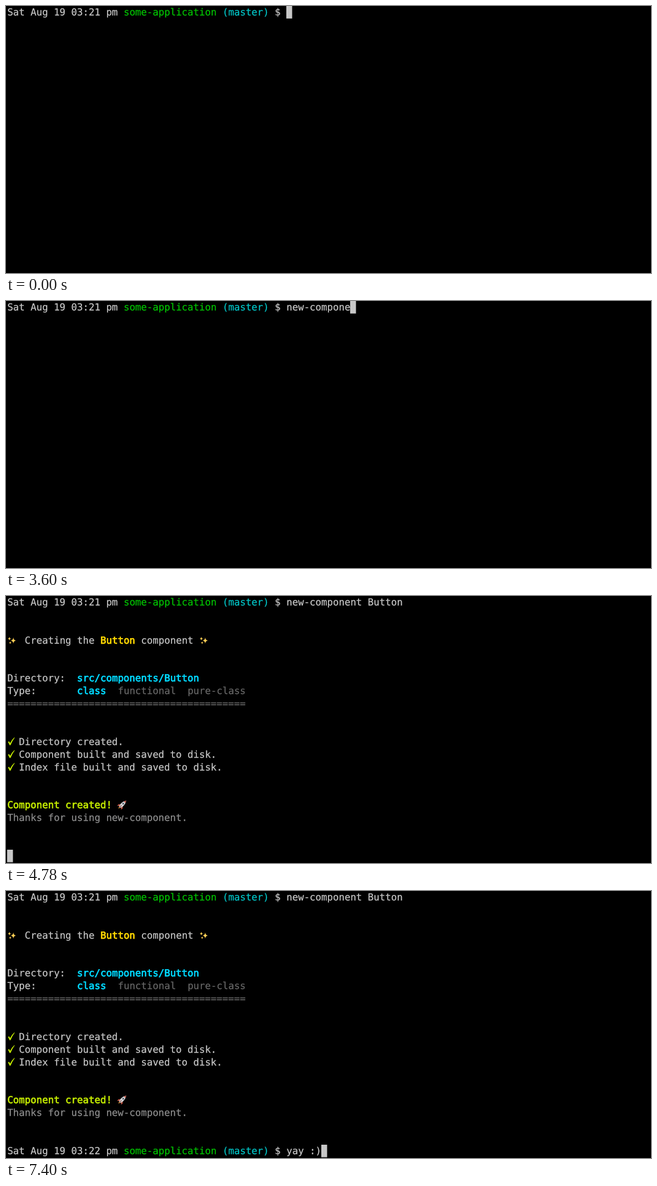
These frames come from a looping animation (1162 px wide and 482 px high, 8960 ms). An HTML page:

```html
<!DOCTYPE html>
<html lang="en">
<head>
<meta charset="utf-8">
<title>Terminal</title>
<style>
  html, body { margin: 0; width: 100%; height: 100%; overflow: hidden; background: #000; }
  svg { display: block; width: 100%; height: 100%; }
  text {
    font: 17.4px "DejaVu Sans Mono", monospace;
    white-space: pre;
    text-rendering: geometricPrecision;
    fill: currentColor;
    stroke: currentColor;
    stroke-width: .25px;
  }
  .bold { stroke-width: .8px; }
</style>
</head>
<body>
<svg viewBox="0 0 1162 482">
  <defs>
    <path id="check" d="M1.2 11.6 L3.2 10.2 L5 13.4 Q8.2 7.2 12.6 3.2 L13.3 3.8 Q9 9.6 5.8 17.2 L4.3 17.4 Z" fill="#c0e600"/>
    <path id="star" d="M0 -1 Q.1 -.1 1 0 Q.1 .1 0 1 Q-.1 .1 -1 0 Q-.1 -.1 0 -1 Z"/>
    <g id="sparkles" fill="#ffcf55">
      <use href="#star" transform="translate(10.8 11.4) scale(4.6 5.6)"/>
      <use href="#star" transform="translate(3.8 8) scale(2.8 3.2)"/>
      <use href="#star" transform="translate(5.2 15.4) scale(2 2.3)"/>
    </g>
    <g id="rocket">
      <g transform="translate(8 10.6) rotate(45)">
        <path d="M-2.6 1 L-5.4 4.4 L-5 8 L-2 5.4 Z M2.6 1 L5.4 4.4 L5 8 L2 5.4 Z" fill="#b9503f"/>
        <path d="M-1.5 6 L0 10 L1.5 6 Z" fill="#f0a63c"/>
        <path d="M0 -10 Q3.7 -5 3 2 L2.1 6.4 L-2.1 6.4 L-3 2 Q-3.7 -5 0 -10 Z" fill="#d3d5d8"/>
        <path d="M0 -10 Q1.5 -8 2.1 -6 L-2.1 -6 Q-1.5 -8 0 -10 Z" fill="#c25a4c"/>
        <circle cy="-2.4" r="1.6" fill="#4b5560"/>
        <path d="M0 2 V7" stroke="#8c4a42" stroke-width="1.2"/>
      </g>
    </g>
  </defs>
  <g id="screen"></g>
</svg>
<script>
const LOOP = 8960, LEFT = 2.4, COL = 10.476, ROW = 22.9, PROMPT = 48;
const GRAY = '#c7c7c7', GREEN = '#00c200', CYAN = '#00c5c7';
const BLUE = '#00d9ff', GOLD = '#ffd900', LIME = '#c0e600', DARK = '#666', MID = '#8e8e8e';
const ENTER = 4670, OUTPUT = 4780, DONE = 4900;

// [time, characters typed]
const COMMAND = { text: 'new-component Button', keys: [
  [2600, 1], [2840, 4], [2980, 6], [3250, 7], [3370, 9], [3480, 10], [3600, 11], [3720, 13],
  [3840, 14], [3960, 15], [4080, 16], [4190, 18], [4310, 19], [4430, 20]] };
const REPLY = { text: 'yay :)', keys: [[6870, 2], [6990, 3], [7140, 4], [7250, 5], [7400, 6]] };

// Columns are fractional, rows sit on whole pixels.
const colX = col => LEFT + col * COL;
const rowY = row => Math.round(row * ROW);
const put = (row, col, str, color = GRAY, cls = '') =>
  `<text x="${colX(col)}" y="${17 + rowY(row)}" color="${color}" class="${cls}">${str}</text>`;
const bold = (row, col, str, color) => put(row, col, str, color, 'bold');
const icon = (row, col, id) =>
  `<use href="#${id}" transform="translate(${colX(col)} ${rowY(row)})"/>`;
const cursor = (row, col) =>
  `<rect x="${Math.round(colX(col))}" y="${rowY(row)}" width="10.5" height="22.6" fill="${GRAY}"/>`;

const prompt = (row, clock) =>
  put(row, 0, `Sat Aug 19 ${clock} pm`) + put(row, 20, 'some-application', GREEN) +
  put(row, 37, '(master)', CYAN) + put(row, 46, '$');

const typed = ({ text, keys }, t) =>
  text.slice(0, keys.reduce((n, [at, count]) => t >= at ? count : n, 0));

const done = (row, str) => icon(row, 0, 'check') + put(row, 2, str);

const report = [
  icon(3, 0, 'sparkles'), put(3, 3, 'Creating the'), bold(3, 16, 'Button', GOLD),
  put(3, 23, 'component'), icon(3, 33, 'sparkles'),
  put(6, 0, 'Directory:'), bold(6, 12, 'src/components/Button', BLUE),
  put(7, 0, 'Type:'), bold(7, 12, 'class', BLUE),
  put(7, 19, 'functional', DARK), put(7, 31, 'pure-class', DARK),
  put(8, 0, '='.repeat(41), DARK),
  done(11, 'Directory created.'),
  done(12, 'Component built and saved to disk.'),
  done(13, 'Index file built and saved to disk.'),
  bold(16, 0, 'Component created!', LIME), icon(16, 19, 'rocket'),
  put(17, 0, 'Thanks for using new-component.', MID)
].join('');

function draw(t) {
  const command = typed(COMMAND, t);
  const first = prompt(0, '03:21') + put(0, PROMPT, command);
  if (t < ENTER) return first + cursor(0, PROMPT + command.length);
  if (t < OUTPUT) return first + cursor(1, 0);
  if (t < DONE) return first + report + cursor(20, 0);
  const reply = typed(REPLY, t);
  return first + report + prompt(20, '03:22') + put(20, PROMPT, reply) +
    cursor(20, PROMPT + reply.length);
}

const screen = document.getElementById('screen');
const start = performance.now();
let shown = '';
function tick() {
  const next = draw((performance.now() - start) % LOOP);
  if (next !== shown) screen.innerHTML = shown = next;
  requestAnimationFrame(tick);
}
tick();
</script>
</body>
</html>
```
